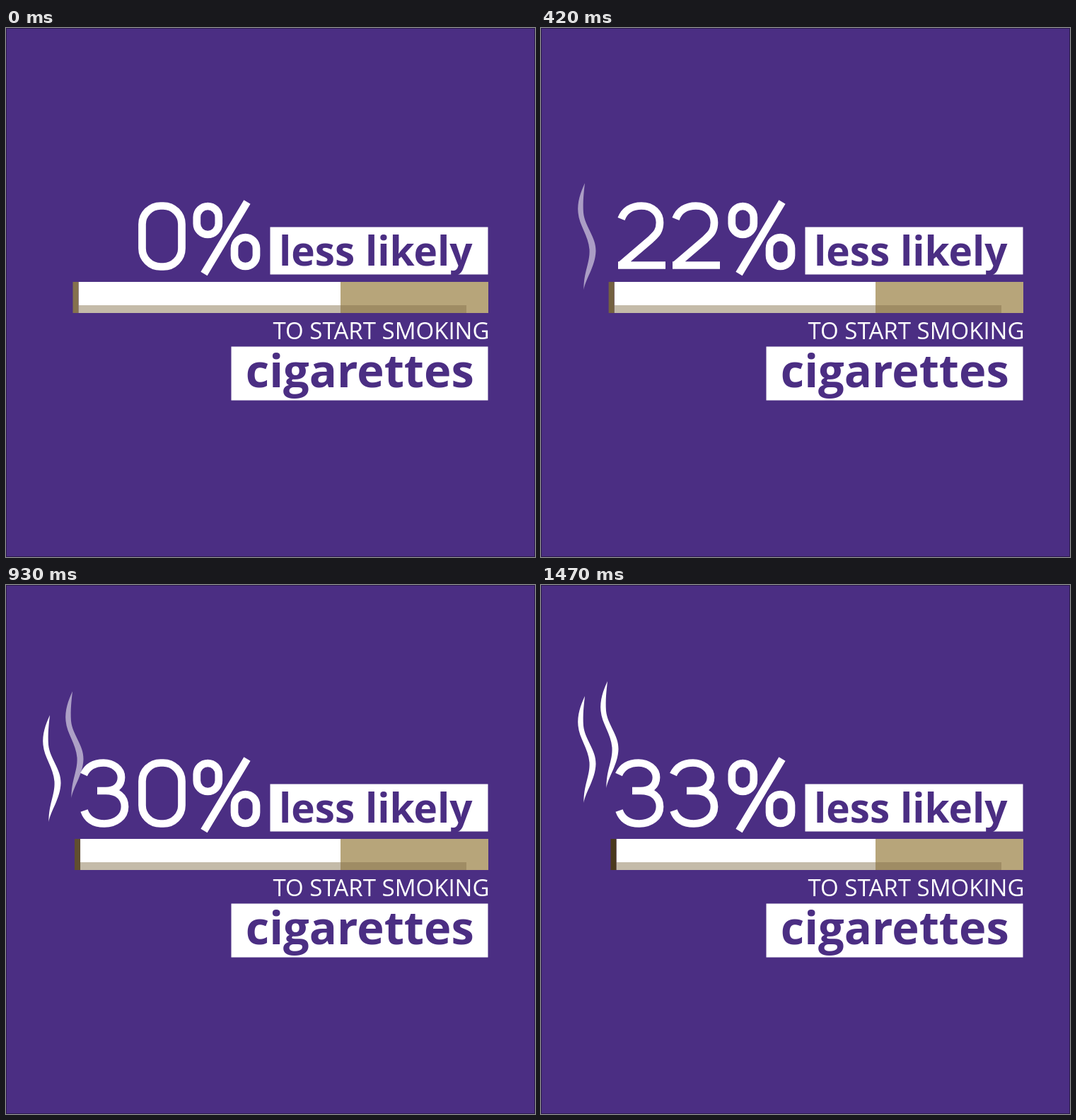
Animation of 748x748 px, one loop 3.47 s. Source, as an HTML page with a canvas:

```html
<!DOCTYPE html>
<html lang="en">
<head>
<meta charset="utf-8">
<title>Less likely to start smoking</title>
<style>
  html, body { margin: 0; width: 100%; height: 100%; overflow: hidden; background: #4b2e83; }
  canvas { display: block; width: 100vw; height: 100vh; }
</style>
</head>
<body>
<canvas id="stage" width="748" height="748"></canvas>
<script>
const ctx = document.getElementById('stage').getContext('2d');
const LOOP = 3470, MOVE = 1470, STEP = 30;
const PURPLE = '#4b2e83', GOLD = '#b7a57a', WHITE = '#fff';
const FONT = '"Open Sans", "Noto Sans", sans-serif';

const clamp = u => Math.max(0, Math.min(1, u));
const easeOut = (u, power) => 1 - (1 - clamp(u)) ** power;
const easeSine = u => Math.sin(clamp(u) * Math.PI / 2);
const easeInOut = u => (u + (1 - Math.cos(Math.PI * u)) / 2) / 2;

// A quick start that settles into a slow climb to 33
const count = t => Math.floor(15 * easeSine(t / 550) + 18 * easeOut(t / MOVE, 1.8));

const wisps = [
  { x: 0, y: t => 238.5 - 81.5 * easeInOut(t / MOVE), alpha: t => clamp(t / 790) },
  { x: 32, y: t => 165 - 29 * easeOut((t - 570) / 900, 1.4), alpha: t => clamp((t - 620) / 570) }
];
const wispShape = new Path2D(
  'M62 0C56 13 51 27 52.5 42C54 60 67 74 68.5 94C69.5 113 60 126 60.5 151' +
  'C62.5 136 77 118 77.5 96C78 76 62 62 60 42C59 26 60.5 14 62 0Z');

// Rounded ring as a path string
const ring = (x, y, w, h, r) =>
  `M${x + r} ${y}h${w - 2 * r}a${r} ${r} 0 0 1 ${r} ${r}v${h - 2 * r}a${r} ${r} 0 0 1 ${-r} ${r}` +
  `h${2 * r - w}a${r} ${r} 0 0 1 ${-r} ${-r}v${2 * r - h}a${r} ${r} 0 0 1 ${r} ${-r}z`;

// Centre lines of the numerals
const glyphs = [
  ring(10.5, 5.5, 56, 86, 26),
  'M1.5 25L25 5M26.2 .5V95',
  'M8.5 24C13 12 23 5.5 37 5.5C53 5.5 63 16 63 29S57 46 50 53L8 89M4 89.5H71',
  'M5 22C10 11 20 5.5 33 5.5S58 14 58 26S49 45 36 45H24M36 45C52 45 63 53 63 67.5S50 91.5 34 91.5S9.5 84.5 5.5 73',
  'M43 1L8 69H73M52 42V95',
  'M62 6.5H17L13 43C18 38 26 36 34 36S63 47 63 63.5S51 91.5 34 91.5S11 85 6 75',
  ring(9.7, 40, 54, 51.5, 25) + 'M62 22C57 11 48 5.5 37 5.5S9.7 19 9.7 40V66',
  'M5 6.5H65L26 95',
  ring(10, 5.5, 47, 39, 18) + ring(7, 44.5, 54, 47, 22)
].map(d => new Path2D(d));

// Nine is six turned upside down
glyphs[9] = new Path2D();
glyphs[9].addPath(glyphs[6], new DOMMatrix([-1, 0, 0, -1, 73.4, 97]));

const advance = n => n === 1 ? 41 : n === 6 || n === 9 ? 80 : 77;
const percent = new Path2D(ring(269.8, 252, 31, 40, 15.5) + ring(323, 296, 31, 41, 15.5) + 'M341 246L280 347.5');

function rect(color, x, y, w, h) {
  ctx.fillStyle = color;
  ctx.fillRect(x, y, w, h);
}

function label(text, x, y, size, weight, color) {
  ctx.font = `${weight} ${size}px ${FONT}`;
  ctx.textAlign = 'center';
  ctx.fillStyle = color;
  ctx.fillText(text, x, y);
}

// Sets the digits from right to left against the percent sign
function drawNumber(value) {
  ctx.strokeStyle = WHITE;
  ctx.lineWidth = 10.7;
  ctx.stroke(percent);
  ctx.save();
  ctx.translate(259, 246);
  for (const n of [...String(value)].reverse().map(Number)) {
    ctx.translate(-advance(n), 0);
    ctx.stroke(glyphs[n]);
  }
  ctx.restore();
}

function drawWisp({ x, y, alpha }, t) {
  ctx.save();
  ctx.globalAlpha = alpha(t);
  ctx.translate(x, y(t));
  ctx.fillStyle = WHITE;
  ctx.fill(wispShape);
  ctx.restore();
}

function drawCigarette(t) {
  const p = t / MOVE, x = 94.5 + 4 * p;
  const mix = (a, b) => Math.round(a + (b - a) * p);
  rect(WHITE, x + 8, 359, 465 - x, 44);
  rect(GOLD, 473, 359, 209, 44);
  rect('rgba(133,113,77,.48)', x + 8, 392, 643 - x, 11);
  rect(`rgb(${mix(133, 74)},${mix(113, 57)},${mix(77, 30)})`, x, 359, 8, 44);
}

function draw(t) {
  rect(PURPLE, 0, 0, 748, 748);
  ctx.strokeStyle = '#2b1a4c';
  ctx.lineWidth = 1;
  ctx.strokeRect(.5, .5, 747, 747);

  wisps.forEach(w => drawWisp(w, t));
  drawNumber(count(t));
  drawCigarette(t);

  rect(WHITE, 373.5, 281.5, 308, 67);
  label('less likely', 522.8, 336, 56.7, 700, PURPLE);
  label('TO START SMOKING', 530.5, 440, 33, 400, WHITE);
  rect(WHITE, 318.5, 450.5, 363, 76);
  label('cigarettes', 500.3, 508, 65, 700, PURPLE);
}

const start = performance.now();
function tick() {
  const t = (performance.now() - start) % LOOP;
  draw(Math.min(MOVE, Math.floor(t / STEP) * STEP));
  requestAnimationFrame(tick);
}
tick();
</script>
</body>
</html>
```
